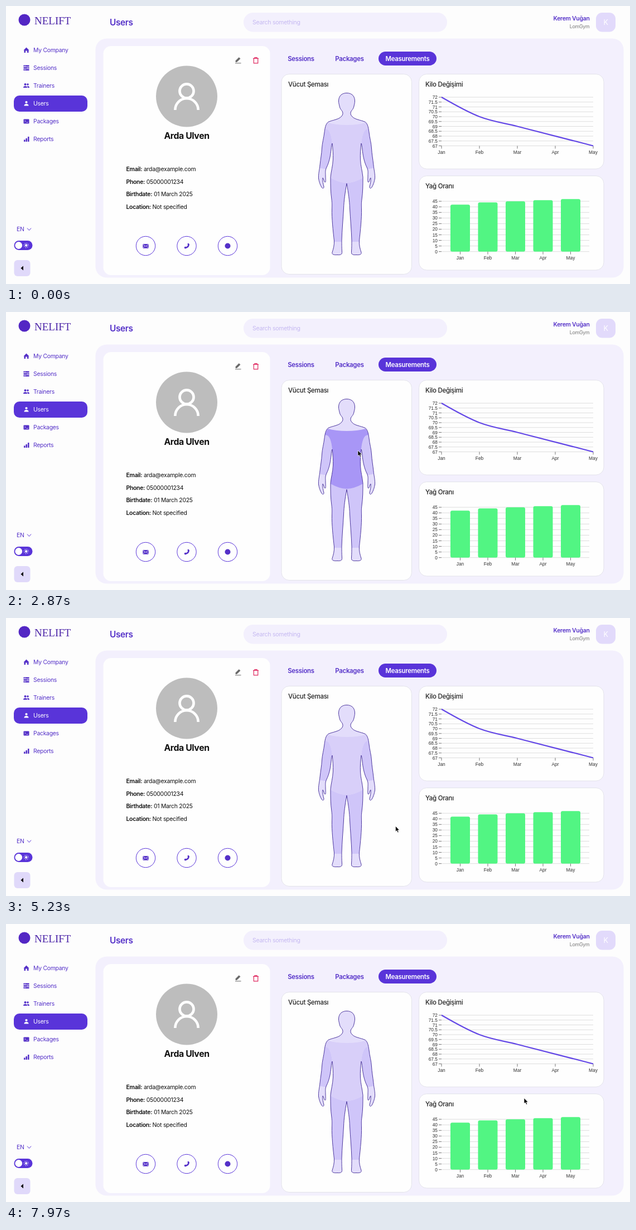
Recreate the animation shown at these times as an HTML page. Size 1119 px wide and 500 px high, loop 8000 ms.

```html
<!DOCTYPE html>
<html lang="en">
<head>
<meta charset="utf-8">
<title>User measurements</title>
<style>
  html, body { margin: 0; width: 100%; height: 100%; overflow: hidden; background: #fdfdfd; }
  svg { display: block; width: 1119px; height: 500px; }
  text { font: 10.4px Inter, sans-serif; letter-spacing: -.025em; fill: #111; }
  .menu, .purple { fill: #5430c8; }
  .bold { font-weight: 600; }
  .title { font-size: 11.5px; font-weight: 550; fill: #222; }
  .tab { font-size: 11.4px; font-weight: 600; text-anchor: middle; fill: #5430c8; }
  .white, .tab.white { fill: #fff; }
  .axis { font: 8.4px "Liberation Sans", Arial, sans-serif; letter-spacing: 0; fill: #333; }
  .end { text-anchor: end; }
  .mid { text-anchor: middle; }
  .card { fill: #fefefe; stroke: #dedde6; stroke-width: .8; }
  .line { fill: none; stroke: #5934d9; stroke-width: 1; }
</style>
</head>
<body>
<svg id="stage" viewBox="0 0 1119 500">
  <defs>
    <filter id="shadow" x="-10%" y="-30%" width="120%" height="180%">
      <feDropShadow dx="0" dy="1" stdDeviation="1.3" flood-opacity=".28"/>
    </filter>
    <clipPath id="half"><path id="outline"/></clipPath>
  </defs>

  <rect width="1119" height="500" fill="#fdfdfd"/>
  <circle cx="33" cy="25" r="10.5" fill="#5327c4"/>
  <text x="51" y="32.5" style="font:19px 'Liberation Serif',serif;letter-spacing:0;fill:#4c25a8">NELIFT</text>

  <rect x="14" y="161" width="132" height="29" rx="10" fill="#5934d9"/>
  <g id="menu"></g>
  <g class="purple">
    <path d="M31.5 79.5L36.5 74.5L41.5 79.5H40.5V84H38V80.5H35V84H32.5V79.5Z"/>
    <path d="M31.5 106.5H41.5V109H31.5ZM31.5 110H41.5V112.5H31.5ZM31.5 113.5H41.5V116H31.5Z"/>
    <circle cx="34.5" cy="141" r="2"/><circle cx="39" cy="141" r="1.8"/>
    <path d="M31 147Q31 144 34.5 144T38 147ZM38.8 147Q38.8 145 37.8 144.2Q42 143.6 42 147Z"/>
    <rect x="31.5" y="203.5" width="10" height="8" rx="1"/>
    <path d="M32 240.5H34.5V244H32ZM35.4 238H38V244H35.4ZM39 235H41.5V244H39Z"/>
  </g>
  <path d="M33.5 205.5l1.7 1.7l-1.7 1.7M36.5 209.3h3M33 108h2M38 111.5h2M33 114.7h2" fill="none" stroke="#fff" stroke-width=".7"/>
  <g fill="#fff"><circle cx="36.5" cy="173" r="2.1"/><path d="M32.5 179.5Q32.5 176 36.5 176T40.5 179.5Z"/></g>

  <text x="19" y="405" class="menu">EN</text>
  <path d="M38 399.5l3.5 4l3.5-4" class="line"/>
  <rect x="14.5" y="422" width="33" height="17" rx="8.5" fill="#5934d9"/>
  <circle cx="22.7" cy="430.5" r="6.4" fill="#fff"/>
  <circle cx="36.3" cy="430.5" r="2.2" fill="#fff"/>
  <circle cx="36.3" cy="430.5" r="4" fill="none" stroke="#fff" stroke-width="1.3" stroke-dasharray="1 2.14"/>
  <rect x="14.5" y="457" width="29" height="29" rx="6" fill="#e0d9fa"/>
  <path d="M31 467.5v8l-4.5-4Z"/>

  <text x="186" y="35" class="purple bold" style="font-size:15.4px">Users</text>
  <rect x="426" y="12" width="365" height="34.5" rx="17" fill="#f3f0fd"/>
  <text x="442" y="33.3" style="font-size:10.5px;fill:#c5b8f1">Search something</text>
  <text x="1046.5" y="25.7" class="purple bold end">Kerem Vuğan</text>
  <text x="1046.5" y="39.8" class="end" style="font-size:8.8px;fill:#777">LomGym</text>
  <rect x="1058" y="12" width="35" height="34.5" rx="11" fill="#e2dafb"/>
  <text x="1075.5" y="33.5" class="mid white" style="font-size:12.5px">K</text>

  <rect x="160.5" y="58.5" width="947" height="430" rx="20" fill="#f3f0fd"/>
  <rect x="174.5" y="72" width="299" height="412" rx="14" fill="#fefefe"/>
  <path d="M411 102.8h10.5M412 100.5v-2l5.8-5.8l2 2l-5.8 5.8Z" fill="#666" stroke="#666" stroke-width="1"/>
  <path d="M443 94.3h10M446 94v-1.3h4V94M444.3 94.8v8h7.4v-8" fill="none" stroke="#df2860" stroke-width="1.2"/>
  <circle cx="324" cy="162.5" r="55" fill="#bdbdbd"/>
  <g fill="none" stroke="#fff" stroke-width="4.6">
    <circle cx="324" cy="153" r="12.6"/><path d="M303.3 187A20.7 20.7 0 0 1 344.7 187"/>
  </g>
  <text x="324" y="239" class="mid" style="font-size:15.8px;font-weight:650">Arda Ulven</text>
  <g id="info"></g>
  <g class="line">
    <circle cx="250.5" cy="431.5" r="17.2"/><circle cx="324" cy="431.5" r="17.2"/><circle cx="397.5" cy="431.5" r="17.2"/>
  </g>
  <rect x="245.3" y="428" width="10.4" height="7.8" rx="1" fill="#5430c8"/>
  <path d="M245.5 428.7l5 3.6l5-3.6M245.5 435.3l3.4-3.5M255.5 435.3l-3.4-3.5" fill="none" stroke="#fff" stroke-width=".8"/>
  <path d="M327.5 428.5Q327.5 434.5 320.5 435" fill="none" stroke="#5430c8" stroke-width="2.6"/>
  <path d="M325.3 427.5l2.5-.8l1.2 3l-2.5 1.5ZM319.3 434l2.7-1.5l1.8 2.4l-2.5 1.9Z" class="purple"/>
  <circle cx="397.5" cy="431.5" r="5" class="purple"/>

  <text x="529" y="98.8" class="tab">Sessions</text>
  <text x="616" y="98.8" class="tab">Packages</text>
  <rect x="668" y="82" width="104" height="25" rx="12.5" fill="#5934d9"/>
  <text x="720" y="98.8" class="tab white">Measurements</text>

  <rect x="494" y="122.5" width="233.5" height="360" rx="14" class="card"/>
  <rect x="740.5" y="122.5" width="331.5" height="170.5" rx="14" class="card"/>
  <rect x="740.5" y="305.5" width="331.5" height="169.5" rx="14" class="card"/>
  <text x="506" y="145.2" class="title">Vücut Şeması</text>
  <text x="752" y="145.2" class="title">Kilo Değişimi</text>
  <text x="752" y="328.2" class="title">Yağ Oranı</text>

  <g id="body"></g>
  <g id="charts"></g>

  <g id="tip" visibility="hidden">
    <rect x="-51" y="-30" width="102" height="20" rx="2" fill="#fff" filter="url(#shadow)"/>
    <rect x="-46" y="-25" width="9.5" height="9.5" fill="#52f583"/>
    <text x="-31.5" y="-16.3" style="font-size:10.2px;fill:#222">muscle - <tspan id="tipMonth"></tspan>: <tspan id="tipValue" class="bold"></tspan></text>
  </g>
  <path id="cursor" d="M0 0V10L2.3 8L4 11.8L5.7 11L4.1 7.4H7.2Z" stroke="#fff" stroke-width=".7"/>
</svg>

<script>
const LOOP = 8000, TIP_LAG = 200, CENTER = 611;
const MONTHS = ['Jan', 'Feb', 'Mar', 'Apr', 'May'];
const FAT = [42, 44, 45, 46, 47];
const HOVER = '#a896f6';
const $ = id => document.getElementById(id);

function add(parent, tag, attrs, text = '') {
  const node = document.createElementNS('http://www.w3.org/2000/svg', tag);
  for (const key in attrs) node.setAttribute(key, attrs[key]);
  node.textContent = text;
  return parent.appendChild(node);
}

['My Company', 'Sessions', 'Trainers', 'Users', 'Packages', 'Reports'].forEach((label, i) =>
  add($('menu'), 'text', { x: 49, y: 82.8 + i * 32, class: i === 3 ? 'white' : 'menu' }, label));

[['Email:', 'arda@example.com'], ['Phone:', '05000001234'],
 ['Birthdate:', '01 March 2025'], ['Location:', 'Not specified']].forEach(([key, value], i) => {
  const row = add($('info'), 'text', { x: 215.5, y: 297 + i * 22.5 });
  add(row, 'tspan', { class: 'bold' }, key);
  add(row, 'tspan', {}, ' ' + value);
});

// Left half of the figure; the right half is its mirror image.
const OUTLINE = `M611 156.5C601 156.5 596.5 163 596.5 171C596.5 175 597.5 177 598 180
  C599 186 603 188 603.7 191C604.3 194 604 196 601 199C597 204 586 205 578 208.5
  C573 212 572 220 571 227C570 237 567 246 566.5 256C566 266 564 276 563 286
  C562 296 560 302 560.5 310C561.5 316 563 321 566 326C568 329 570 328 570 325
  C569 320 567 315 568 309C570 311 570 316 572 317C574 317 573 311 573 306
  C573 299 572 296 575 290C580 280 582 268 583 258C583.5 253 584 249 585 247
  C586 256 587 266 586.5 276C586 288 583 297 582 308C582 322 582 334 584 348
  C585 356 584.5 360 584.5 366C584 380 586.5 405 588.5 422C589 430 587 437 585 443
  C584 447 588 448 594 447.5C600 448 603 447 602.5 442C602 435 602 428 602 422
  C602.5 404 604.5 382 605.5 364C606 350 608 336 611 319`;
const REGIONS = [
  ['arm', '#cfc5f9', 'M555 226L571 221Q582 218 585 247L580 294Q568 293 555 290Z'],
  ['leg', '#cfc5f9', 'M579 307L582 309Q598 318 611 318V424H579Z'],
  ['torso', '#d8cff9', 'M611 214Q592 214 577 210L570 222Q582 217 585 247C586 256 587 266 586.5 276C586 288 583 297 582 309Q598 318 611 318Z']
];
$('outline').setAttribute('d', OUTLINE);
const outlineShape = new Path2D(OUTLINE);
const hitTester = document.createElement('canvas').getContext('2d');

const parts = [];
for (const right of [false, true]) {
  const side = add($('body'), 'g', right ? { transform: `matrix(-1 0 0 1 ${2 * CENTER} 0)` } : {});
  add(side, 'path', { d: OUTLINE, fill: '#e3ddfb' });
  const skin = add(side, 'g', { 'clip-path': 'url(#half)' });
  for (const [name, fill, d] of REGIONS)
    parts.push({ name, fill, right, shape: new Path2D(d), node: add(skin, 'path', { d, fill }) });
  add(side, 'path', { d: OUTLINE, fill: 'none', stroke: '#4f3aa0', 'stroke-width': 1 });
}

const charts = $('charts');
const segment = (d, stroke) => add(charts, 'path', { d, stroke, 'stroke-width': 1, fill: 'none' });

function yAxis(labels, bottom, step, right) {
  labels.forEach((label, i) => {
    const y = bottom - i * step;
    segment(`M781 ${y}H${right}`, '#dddddd');
    segment(`M776 ${y}H781`, '#777');
    add(charts, 'text', { x: 774, y: y + 3, class: 'axis end' }, label);
  });
}
function xAxis(xs, y) {
  xs.forEach((x, i) => {
    segment(`M${x} ${y}v5`, '#777');
    add(charts, 'text', { x, y: y + 14.5, class: 'axis mid' }, MONTHS[i]);
  });
}

yAxis(Array.from({ length: 11 }, (_, i) => 67 + i / 2), 251.5, 8.75, 1053);
xAxis(MONTHS.map((_, i) => 781 + i * 68), 251.5);
add(charts, 'path', {
  d: 'M781 164C803.7 177.1 826.3 190.3 849 199C871.7 207.8 894.3 210.7 917 216.5L1053 251.5',
  fill: 'none', stroke: '#6347e6', 'stroke-width': 2.2
});

yAxis(Array.from({ length: 10 }, (_, i) => i * 5), 441.7, 10.06, 1046);
const bars = FAT.map((value, i) => ({
  value, month: MONTHS[i], x: 797 + i * 49.5, y: 441.7 - value * 2.012, width: 35
}));
for (const { x, y, width } of bars)
  add(charts, 'rect', { x, y, width, height: 441.7 - y, rx: 3, fill: '#52f583' });
xAxis(bars.map(bar => bar.x + 17.5), 441.7);

// Pointer stops: time, x, y.
const STOPS = [
  [700, 640, -14], [1300, 556, 180], [1700, 556, 180], [2300, 600, 225], [2870, 631, 249],
  [3250, 650, 255], [3500, 648, 262], [3900, 630, 320], [4270, 622, 344], [4800, 624, 356],
  [5700, 783, 395], [6270, 810, 387], [6400, 810, 387], [6930, 885, 389], [7300, 914, 384], [7970, 929, 313]
];

function pointerAt(t) {
  const next = STOPS.findIndex(stop => stop[0] > t);
  if (next < 1) return (next ? STOPS[STOPS.length - 1] : STOPS[0]).slice(1);
  const [t0, x0, y0] = STOPS[next - 1], [t1, x1, y1] = STOPS[next];
  const u = (t - t0) / (t1 - t0), k = u * u * (3 - 2 * u);
  return [x0 + (x1 - x0) * k, y0 + (y1 - y0) * k];
}

function hoveredPart(x, y) {
  const right = x > CENTER;
  const inside = shape => hitTester.isPointInPath(shape, right ? 2 * CENTER - x : x, y);
  if (!inside(outlineShape)) return undefined;
  return parts.find(part => part.right === right && inside(part.shape));
}

function render(t) {
  const [x, y] = pointerAt(t);
  $('cursor').setAttribute('transform', `translate(${x} ${y})`);

  const hit = hoveredPart(x, y);
  for (const part of parts) {
    const active = hit && part.name === hit.name && (part.name === 'torso' || part === hit);
    part.node.setAttribute('fill', active ? HOVER : part.fill);
  }

  const [tipX, tipY] = pointerAt(t - TIP_LAG);
  const bar = bars.find(b => tipX >= b.x && tipX <= b.x + b.width && tipY >= b.y && tipY < 441);
  $('tip').setAttribute('visibility', bar ? 'visible' : 'hidden');
  if (bar) {
    $('tip').setAttribute('transform', `translate(${tipX} ${tipY})`);
    $('tipMonth').textContent = bar.month;
    $('tipValue').textContent = bar.value;
  }
}

const start = performance.now();
function tick() {
  render((performance.now() - start) % LOOP);
  requestAnimationFrame(tick);
}
tick();
</script>
</body>
</html>
```
